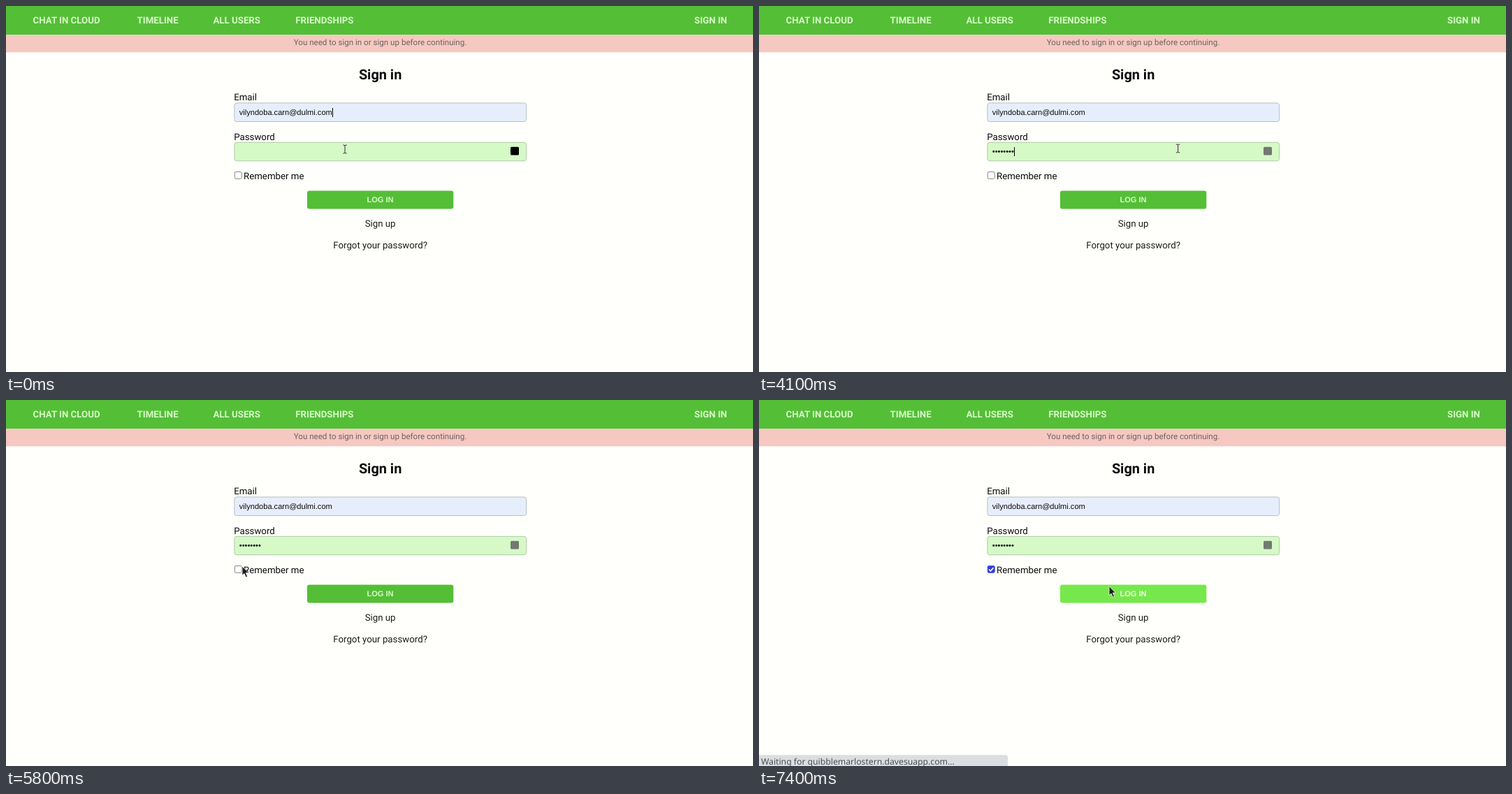
Recreate the animation shown at these times as an HTML page. Size 1069 by 524 pixels, loop 8 s.

```html
<!DOCTYPE html>
<html lang="en">
<head>
<meta charset="utf-8">
<title>Sign in</title>
<style>
  html, body { margin: 0; width: 100%; height: 100%; overflow: hidden; background: #fffffb; }
  svg { display: block; width: 1069px; height: 524px; text-rendering: geometricPrecision; }
  text { font: 13.28px Roboto, sans-serif; fill: #0a0a0a; white-space: pre; }
  .nav text { font-weight: 700; fill: #d6fac6; }
  .mid text { text-anchor: middle; }
  .mid .flash { font-size: 11.6px; fill: #6e625f; }
  .mid .title { font-size: 19.92px; font-weight: 700; }
  .mid .link { fill: #1c1c1c; }
  text.input { font: 11.07px "Liberation Sans", Arial, sans-serif; }
  .mid .label { font: 700 11.07px "Liberation Sans", Arial, sans-serif; fill: #d6fac6; }
  .hover .label { fill: #f4fff0; }
  .face { fill: #54be37; }
  .hover .face { fill: #76e84b; }
  #status text { font: 12.2px "Noto Sans", sans-serif; fill: #4b4e51; }
</style>
</head>
<body>
<svg viewBox="0 0 1069 524">
  <rect width="1069" height="524" fill="#fffffb"/>
  <rect width="1069" height="41.3" fill="#54be37"/>
  <rect y="41.3" width="1069" height="25" fill="#f6c8c2"/>

  <g class="nav">
    <text x="38.6" y="24.8">CHAT IN CLOUD</text>
    <text x="187.6" y="24.8">TIMELINE</text>
    <text x="296.4" y="24.8">ALL USERS</text>
    <text x="414.3" y="24.8">FRIENDSHIPS</text>
    <text x="985" y="24.8">SIGN IN</text>
  </g>

  <g class="mid">
    <text class="flash" x="535.5" y="56.3">You need to sign in or sign up before continuing.</text>
    <text class="title" x="535.6" y="104.7">Sign in</text>
    <text class="link" x="535.6" y="316">Sign up</text>
    <text class="link" x="535.6" y="347.3">Forgot your password?</text>
    <g id="button">
      <rect class="face" x="431" y="264.4" width="209.3" height="26" rx="3.2"/>
      <text class="label" x="535.5" y="281.2">LOG IN</text>
    </g>
  </g>

  <text x="326.2" y="135.2">Email</text>
  <rect x="326.9" y="138.9" width="417.6" height="26.6" rx="3.2" fill="#e7eefb" stroke="#b2b8c0" stroke-width=".9"/>
  <text class="input" x="333.8" y="156.2">vilyndoba.carn@dulmi.com</text>

  <text x="326.2" y="191.6">Password</text>
  <rect x="326.9" y="195.3" width="417.6" height="26.4" rx="3.2" fill="#d6fac6" stroke="#a9c49f" stroke-width=".9"/>
  <text class="input" id="dots" x="333.8" y="212.3"></text>
  <rect id="badge" x="722" y="201.8" width="12" height="11.6" rx="1.5"/>

  <rect id="box" x="327.3" y="237.4" width="9.9" height="9.9" rx="1.8" stroke-width=".9"/>
  <path id="tick" d="M329.2 242.5l2.2 2.3 4-4.6" fill="none" stroke="#fff" stroke-width="1.6"/>
  <text x="340" y="247.9">Remember me</text>

  <rect id="caret" width="1" height="13"/>

  <g id="status">
    <path d="M0 508.3H352.5a3.5 3.5 0 0 1 3.5 3.5V524H0Z" fill="#dbdee0"/>
    <text x="3" y="522.2">Waiting for quibblemarlostern.davesuapp.com…</text>
  </g>

  <g id="beam" fill="none">
    <path d="M-2.6-6Q0-6 0-5V5Q0 6-2.6 6M2.6-6Q0-6 0-5M0 5Q0 6 2.6 6" stroke="#fff" stroke-width="2" opacity=".5"/>
    <path d="M-2.6-6Q0-6 0-5V5Q0 6-2.6 6M2.6-6Q0-6 0-5M0 5Q0 6 2.6 6" stroke="#222"/>
  </g>
  <path id="arrow" d="M0 0V13.2L3 10.5 5.3 15.8 7.6 14.8 5.3 9.6H9.4Z" fill="#1b1b1b" stroke="#fff" stroke-width=".8"/>
</svg>

<script>
  const LOOP = 8000;
  const $ = id => document.getElementById(id);
  const start = {
    cursor: 'beam', x: 485, y: 205, field: 'email', caret: true, typed: 0,
    focused: false, hover: false, checked: false, loading: false
  };

  const type = typed => ({ typed, caret: true });
  const move = (x, y, more) => ({ x, y, ...more });

  // Each step holds until the next one.
  const steps = [
    [100, move(512, 205)],
    [200, move(570, 204, { caret: false })],
    [300, move(599.6, 204)],
    [700, { field: 'password', focused: true, caret: true }],
    [1300, { caret: false }],
    [1500, type(1)],
    [1900, type(0)],
    [2100, { caret: false }],
    [2400, type(1)],
    [2600, type(2)],
    [3100, type(3)],
    [3200, type(4)],
    [3500, type(5)],
    [3600, type(6)],
    [3800, type(7)],
    [4100, type(8)],
    [4600, move(586, 219.5, { cursor: 'arrow', caret: false })],
    [4800, move(544, 258, { hover: true })],
    [5000, move(512, 271)],
    [5100, move(459.3, 274.5, { hover: false })],
    [5200, move(418, 260, { caret: true })],
    [5500, move(368, 242)],
    [5600, move(338, 238)],
    [5800, { caret: false }],
    [5900, move(334, 237.5)],
    [6100, { checked: true }],
    [6500, move(356, 237)],
    [6600, move(483, 264.8, { hover: true })],
    [6800, move(501, 266.5)],
    [7400, { loading: true }]
  ];

  const show = (id, on) => $(id).style.display = on ? '' : 'none';

  function draw(time) {
    const s = Object.assign({}, start, ...steps.filter(([t]) => t <= time).map(([, change]) => change));
    const inEmail = s.field === 'email';

    for (const id of ['beam', 'arrow']) show(id, s.cursor === id);
    $(s.cursor).setAttribute('transform', `translate(${s.x} ${s.y})`);

    $('dots').textContent = '•'.repeat(s.typed);
    $('caret').setAttribute('x', inEmail ? 467 : Math.round(334 + s.typed * 3.875));
    $('caret').setAttribute('y', inEmail ? 146 : 202);
    show('caret', s.caret);

    $('badge').setAttribute('fill', s.focused ? '#737873' : '#000');
    $('button').classList.toggle('hover', s.hover);
    $('box').setAttribute('fill', s.checked ? '#3440d8' : '#fff');
    $('box').setAttribute('stroke', s.checked ? '#3440d8' : '#767676');
    show('tick', s.checked);
    show('status', s.loading);
  }

  const origin = performance.now();
  function tick() {
    draw((performance.now() - origin) % LOOP);
    requestAnimationFrame(tick);
  }
  tick();
</script>
</body>
</html>
```
